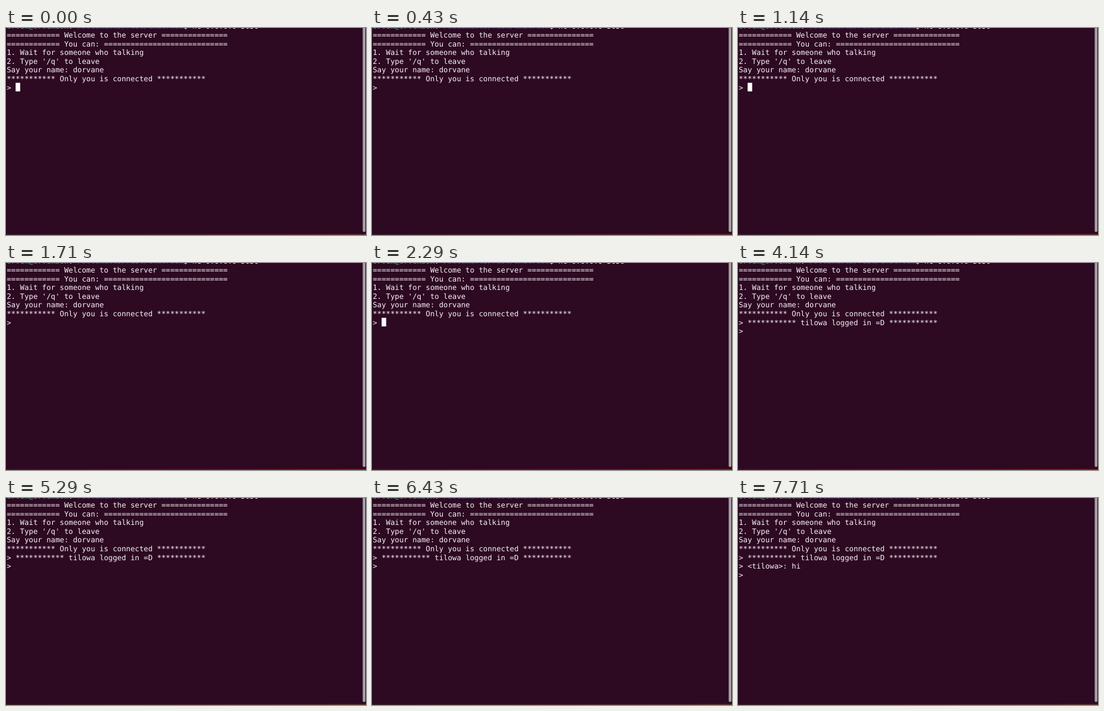
These frames come from a looping animation (600x346 px, 8 s). An HTML page:

```html
<!DOCTYPE html>
<html lang="en">
<head>
<meta charset="utf-8">
<title>Terminal chat</title>
<style>
  html, body { margin: 0; width: 100%; height: 100%; overflow: hidden; background: #2d0922; }
  svg { display: block; width: 600px; height: 346px; }
  text {
    font: 12.24px "DejaVu Sans Mono", monospace;
    fill: #f6f4f5;
    white-space: pre;
    text-rendering: geometricPrecision;
  }
  .host { fill: #26a269; font-weight: bold; }
  .path { fill: #174f96; font-weight: bold; }

  .cursor { fill: #fff; animation: blink 8s step-end infinite, move 8s step-end infinite; }
  .login { animation: login 8s step-end infinite; }
  .message { animation: message 8s step-end infinite; }

  @keyframes blink {
    0%, 14.25%, 28.625%, 42.875%, 58.875%, 73.25%, 89.25% { opacity: 1; }
    5.375%, 21.375%, 35.75%, 51.75%, 66.125%, 80.375%, 96.375%, 100% { opacity: 0; }
  }
  @keyframes move {
    0% { transform: translateY(0); }
    46.375% { transform: translateY(14.65px); }
    87.5%, 100% { transform: translateY(29.3px); }
  }
  @keyframes login {
    0% { opacity: 0; }
    46.375%, 100% { opacity: 1; }
  }
  @keyframes message {
    0% { opacity: 0; }
    87.5%, 100% { opacity: 1; }
  }
</style>
</head>
<body>
<svg viewBox="0 0 600 346">
  <defs>
    <linearGradient id="edge">
      <stop offset="0" stop-color="#4a1030"/>
      <stop offset=".3" stop-color="#5e1730"/>
      <stop offset=".65" stop-color="#6b1a2b"/>
      <stop offset="1" stop-color="#87241f"/>
    </linearGradient>
  </defs>
  <rect width="600" height="346" fill="#2d0922"/>
  <rect width="1" height="344" fill="#1b0917"/>
  <rect y="344.5" width="600" height="1.5" fill="url(#edge)"/>
  <rect x="594.5" y="-8" width="4.5" height="349" rx="2.2" fill="#a99fa6"/>

  <text x="1.2" y="1.2"><tspan class="host">orvek@orvekbox</tspan>:<tspan class="path">~/Documents/rust/chatroom</tspan>$ nc 0.0.0.0 5050</text>
  <text x="1.2" y="15.9">============ Welcome to the server ===============</text>
  <text x="1.2" y="30.5">============ You can: ============================</text>
  <text x="1.2" y="45.1">1. Wait for someone who talking</text>
  <text x="1.2" y="59.8">2. Type '/q' to leave</text>
  <text x="1.2" y="74.4">Say your name: dorvane</text>
  <text x="1.2" y="89.1">*********** Only you is connected ***********</text>
  <text x="1.2" y="103.7">&gt;</text>
  <g class="login">
    <text x="15.94" y="103.7">*********** tilowa logged in =D ***********</text>
    <text x="1.2" y="118.4">&gt;</text>
  </g>
  <g class="message">
    <text x="15.94" y="118.4">&lt;tilowa&gt;: hi</text>
    <text x="1.2" y="133">&gt;</text>
  </g>
  <rect class="cursor" x="16" y="91.6" width="7.6" height="14.4"/>
</svg>
</body>
</html>
```
